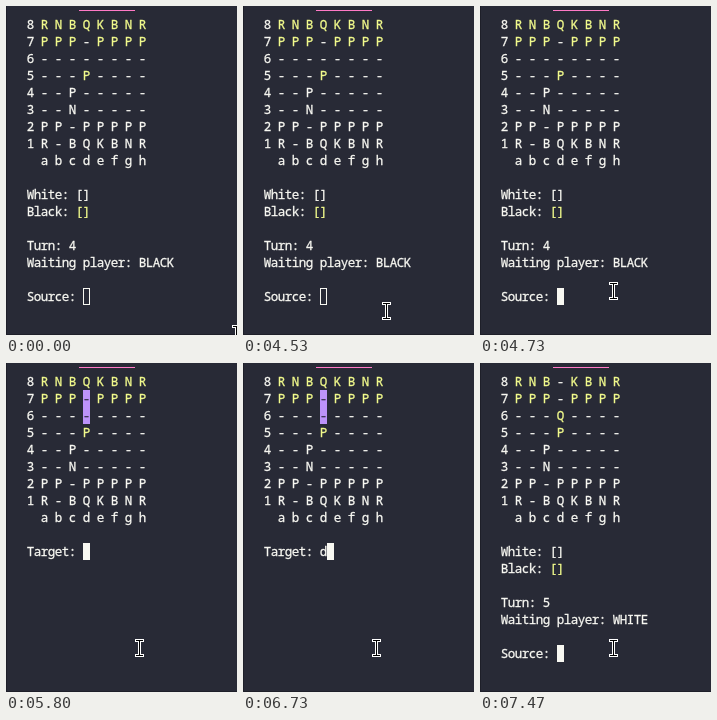
Recreate the animation shown at these times as an HTML page. Size 231 by 329 pixels, loop 8 s.

```html
<!DOCTYPE html>
<html lang="en">
<head>
<meta charset="utf-8">
<title>Terminal chess</title>
<style>
  html, body { margin: 0; width: 100%; height: 100%; overflow: hidden; background: #282a36; }
  svg { display: block; width: 231px; height: 329px; }
  text {
    font: 500 12.5px "Noto Sans Mono", "DejaVu Sans Mono", monospace;
    letter-spacing: -.5px; white-space: pre; stroke-width: .3px;
  }
  .beam path { fill: none; stroke-linecap: square; }
</style>
</head>
<body>
<svg viewBox="0 0 231 329">
  <rect width="231" height="329" fill="#282a36"/>
  <path d="M.5 0V328.5H231" fill="none" stroke="#1e1f29"/>
  <rect x="73" y="4" width="56" height="1" fill="#ff79c6"/>
  <g id="screen"></g>
  <g id="beam" class="beam">
    <path d="M-3-7.5H3M0-7.5V7.5M-3 7.5H3" stroke="#fff" stroke-width="3"/>
    <path d="M-3-7.5H3M0-7.5V7.5M-3 7.5H3" stroke="#000"/>
  </g>
</svg>
<script>
const LOOP = 8000, LEFT = 21, TOP = 10, COL = 7, ROW = 17;
const WHITE = '#f8f8f2', YELLOW = '#f1fa8c', PURPLE = '#bd93f9', DARK = '#3a3350';
const screen = document.getElementById('screen');
const beam = document.getElementById('beam');

// Lower case marks a black piece, drawn in yellow capitals.
const before = ['rnbqkbnr', 'ppp-pppp', '--------', '---p----', '--P-----',
                '--N-----', 'PP-PPPPP', 'R-BQKBNR'];
const after = ['rnb-kbnr', 'ppp-pppp', '---q----', ...before.slice(3)];

const text = (col, row, str, fill = WHITE) =>
  `<text x="${LEFT + col * COL - .25}" y="${TOP + row * ROW + 13}" fill="${fill}" stroke="${fill}">${str}</text>`;

const block = (col, row, fill, rows = 1) =>
  `<rect x="${LEFT + col * COL}" y="${TOP + row * ROW}" width="${COL}" height="${ROW * rows}" fill="${fill}"/>`;

const hollow = (col, row) =>
  `<rect x="${LEFT + col * COL + .5}" y="${TOP + row * ROW + .5}" width="${COL - 1}" height="${ROW - 1}" fill="none" stroke="${WHITE}"/>`;

function board(rows, marked) {
  let out = marked ? block(8, 1, PURPLE, 2) : '';
  rows.forEach((line, r) => {
    out += text(0, r, 8 - r);
    [...line].forEach((ch, c) => {
      const onMark = marked && c === 3 && (r === 1 || r === 2);
      const fill = onMark ? DARK : /[a-z]/.test(ch) ? YELLOW : WHITE;
      out += text(2 + c * 2, r, ch.toUpperCase(), fill);
    });
  });
  return out + text(2, 8, 'a b c d e f g h');
}

function source(rows, turn, player, typed, focused = true) {
  const col = 8 + typed.length;
  return board(rows, false) +
    text(0, 10, 'White: []') + text(0, 11, 'Black:') + text(7, 11, '[]', YELLOW) +
    text(0, 13, 'Turn: ' + turn) + text(0, 14, 'Waiting player: ' + player) +
    text(0, 16, 'Source: ' + typed) +
    (focused ? block(col, 16, WHITE) : hollow(col, 16));
}

const target = (typed, entered) =>
  board(before, true) + text(0, 10, 'Target: ' + typed) +
  (entered ? block(0, 11, WHITE) : block(8 + typed.length, 10, WHITE));

const views = [
  [0, source(before, 4, 'BLACK', '', false)],
  [4730, source(before, 4, 'BLACK', '')],
  [5400, source(before, 4, 'BLACK', 'd')],
  [5600, source(before, 4, 'BLACK', 'd8')],
  [5800, target('')],
  [6730, target('d')],
  [7200, target('d6')],
  [7400, target('d6', true)],
  [7470, source(after, 5, 'WHITE', '')]
];

// Pointer centre over time; it is off stage between its two visits.
const pointer = [
  [0, 230.5, 328], [400, -50, -50], [4530, 143.5, 305],
  [4600, 138.5, 294], [4670, 133.5, 285]
];

const at = (steps, t) => steps.filter(s => s[0] <= t).pop();
let shown;

function draw() {
  const t = performance.now() % LOOP;
  const view = at(views, t);
  if (view !== shown) screen.innerHTML = (shown = view)[1];
  const [, x, y] = at(pointer, t);
  beam.setAttribute('transform', `translate(${x} ${y})`);
  requestAnimationFrame(draw);
}
draw();
</script>
</body>
</html>
```
